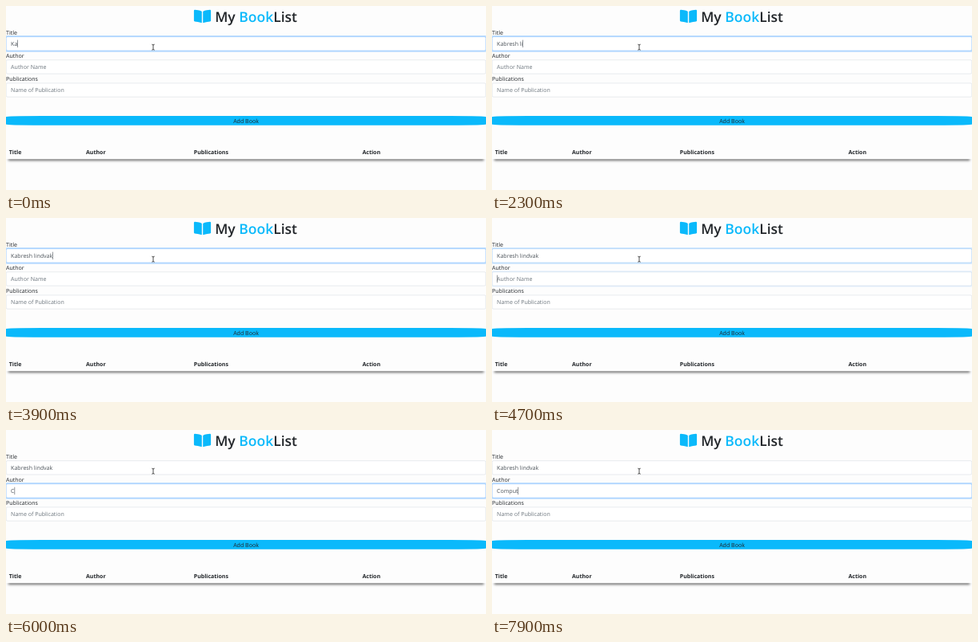
Animation, 600 px wide and 231 px high, one loop 8 s. Source, as an HTML page:

```html
<!DOCTYPE html>
<html lang="en">
<head>
<meta charset="utf-8">
<title>My BookList</title>
<style>
html, body { margin: 0; width: 100%; height: 100%; overflow: hidden; background: #fdfdfd; }
svg { display: block; width: 600px; height: 231px; }
text { font: 7.06px "Open Sans", "Noto Sans", sans-serif; fill: #212529; white-space: pre; text-rendering: geometricPrecision; }
.head { font-size: 17.5px; font-weight: 600; }
.blue { fill: #0ab9fb; }
.th { font-size: 7px; font-weight: 700; }
.value { fill: #495057; }
.hint { fill: #6c757d; }
.box { fill: #fff; stroke-width: .47; }
.halo { fill: #007bff; }
</style>
</head>
<body>
<svg id="stage" viewBox="0 0 600 231">
  <defs>
    <filter id="blur" x="-5%" y="-50%" width="110%" height="200%"><feGaussianBlur stdDeviation="1.4"/></filter>
    <clipPath id="below"><rect y="192.2" width="600" height="12"/></clipPath>
    <path id="page" d="M0 2.5C2.4 1.1 6.4 .6 8.5 .5Q9.7 .5 9.7 1.6V14Q9.7 15 8.6 15.1C6.8 15.2 3.1 15.5 .6 16.8Q-.2 17.1 -.2 16.3V3Q-.2 2.7 0 2.5Z"/>
  </defs>
  <g class="blue">
    <use href="#page" transform="translate(246.4 4.3)"/>
    <use href="#page" transform="translate(244.6 4.3) scale(-1 1)"/>
  </g>
  <text class="head" x="261.2" y="19.6">My <tspan class="blue">Book</tspan>List</text>
  <g id="form"></g>
  <path class="blue" d="M0 139.2Q0 138 45 138H555Q600 138 600 139.2V148.6Q600 149.8 555 149.8H45Q0 149.8 0 148.6Z"/>
  <text x="300" y="146.8" text-anchor="middle">Add Book</text>
  <g clip-path="url(#below)"><rect x="2.8" y="176" width="594.4" height="18.2" fill="#777" filter="url(#blur)"/></g>
  <g id="columns"></g>
  <rect id="caret" width=".6" height="9.4" fill="#495057"/>
  <path d="M182.3 48.2Q184 48.2 184 49.2Q184 48.2 185.7 48.2M184 49V54.4M182.3 55.2Q184 55.2 184 54.2Q184 55.2 185.7 55.2" fill="none" stroke="#222" stroke-width=".8"/>
</svg>
<script>
const LOOP = 8000, BLINK = 500, FOCUS_AT = 4650, FADE = 150;
const $ = id => document.getElementById(id);

function add(parent, tag, attrs, label = "") {
  const el = document.createElementNS("http://www.w3.org/2000/svg", tag);
  for (const k in attrs) el.setAttribute(k, attrs[k]);
  el.textContent = label;
  parent.appendChild(el);
  return el;
}

function makeField(label, hint, top) {
  const form = $("form");
  add(form, "text", { x: 0, y: top - 2.8 }, label);
  const halo = add(form, "rect", { class: "halo", x: -1.5, y: top - 1.5, width: 603, height: 20.8, rx: 3.2 });
  const box = add(form, "rect", { class: "box", x: .23, y: top + .23, width: 599.54, height: 17.35, rx: 1.8 });
  const text = add(form, "text", { x: 6.1, y: top + 11.6 });
  return { hint, top, halo, box, text };
}

const title = makeField("Title", "", 38.4);
const author = makeField("Author", "Author Name", 67.5);
const publisher = makeField("Publications", "Name of Publication", 96.6);

[["Title", 3.8], ["Author", 100], ["Publications", 234.8], ["Action", 445.5]]
  .forEach(([name, x]) => add($("columns"), "text", { class: "th", x, y: 185.8 }, name));

// Each key time types one more character.
const titleKeys = [0, 0, 200, 800, 1000, 1200, 1500, 1800, 2000, 2200, 2500, 2900, 3200, 3400, 3700];
const authorKeys = [5700, 6500, 6600, 7400, 7600, 7800];
const typed = (text, keys, t) => text.slice(0, keys.filter(k => k <= t).length);

function drawField(field, value, focus) {
  const mix = (a, b) => Math.round(a + (b - a) * focus);
  field.halo.setAttribute("opacity", .25 * focus);
  field.box.setAttribute("stroke", `rgb(${mix(206, 128)},${mix(212, 189)},${mix(218, 255)})`);
  field.text.textContent = value || field.hint;
  field.text.setAttribute("class", value ? "value" : "hint");
}

function draw(t) {
  const p = Math.min(1, Math.max(0, (t - FOCUS_AT) / FADE));
  const focus = p * p * (3 - 2 * p);
  const name = typed("Kabresh lindvak", titleKeys, t);
  const writer = typed("Comput", authorKeys, t);
  drawField(title, name, 1 - focus);
  drawField(author, writer, focus);
  drawField(publisher, "", 0);

  const second = t >= FOCUS_AT;
  const field = second ? author : title;
  const width = second && !writer ? 0 : field.text.getComputedTextLength();
  const keys = second ? [4700, ...authorKeys] : titleKeys;
  const last = Math.max(...keys.filter(k => k <= t), 0);
  const caret = $("caret");
  caret.setAttribute("x", 6.1 + width);
  caret.setAttribute("y", field.top + 4.2);
  caret.setAttribute("opacity", (t - last) % (2 * BLINK) < BLINK ? 1 : 0);
}

const start = performance.now();
function tick() {
  draw((performance.now() - start) % LOOP);
  requestAnimationFrame(tick);
}
tick();
</script>
</body>
</html>
```
